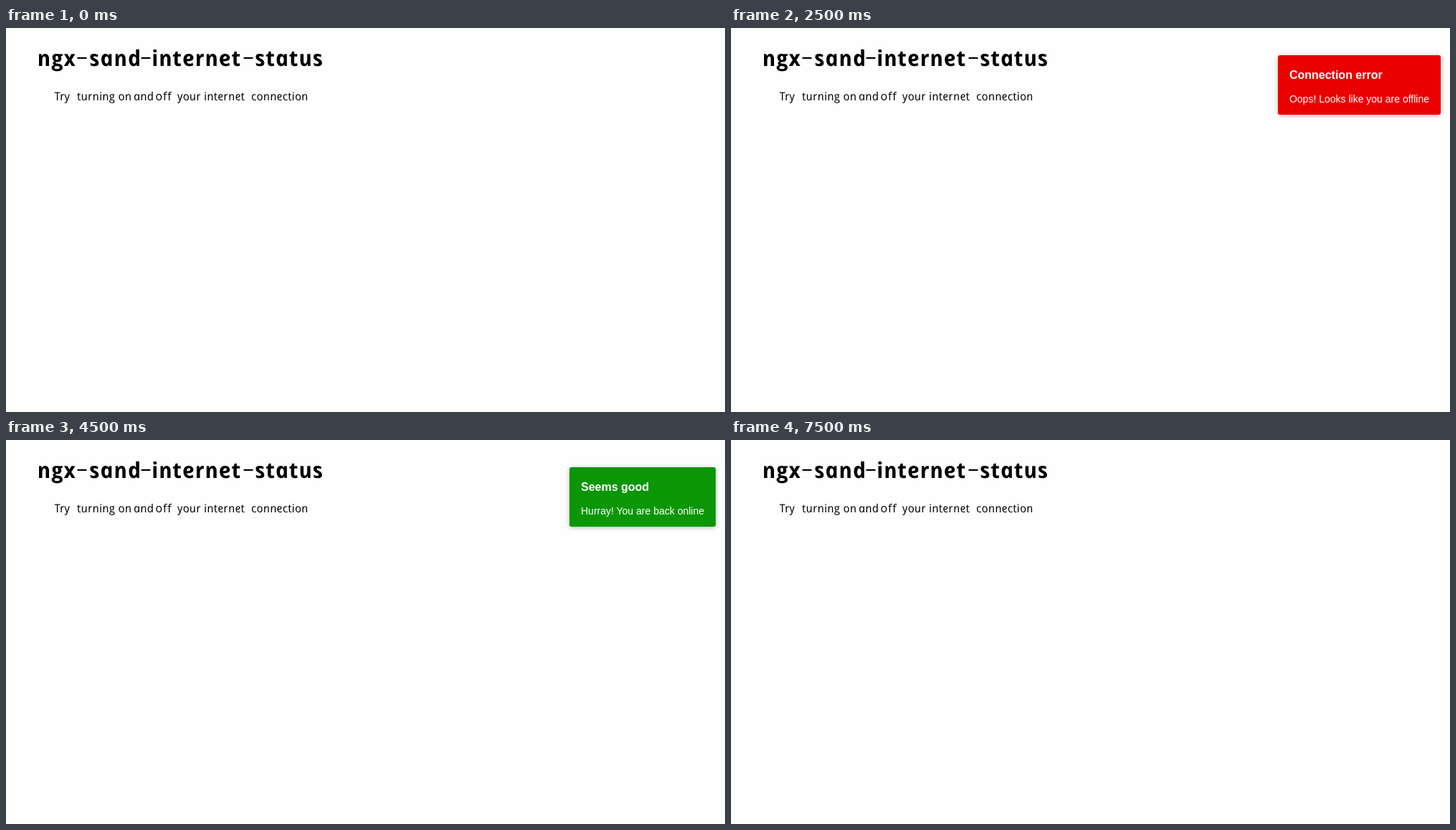
Write an HTML page that moves like this. It is 1003 px wide and 536 px high and loops after 8 s.

```html
<!DOCTYPE html>
<html lang="en">
<head>
<meta charset="utf-8">
<title>ngx-sand-internet-status</title>
<style>
  html, body { margin: 0; width: 100%; height: 100%; overflow: hidden; background: #fefefe; }
  svg { position: absolute; left: 0; top: 0; }
  /* Italic letterforms set upright give a casual, single-storey hand. */
  text { font: italic 16px "Open Sans", "Noto Sans", sans-serif; letter-spacing: .25px; }
  .head { font-size: 30.5px; font-weight: bold; letter-spacing: .9px; }
  .dash { font-size: 56px; font-weight: 300; font-style: normal; letter-spacing: 0; text-anchor: middle; }
  .plain { font-style: normal; letter-spacing: .8px; font-variant-ligatures: none; }
  #toast {
    position: absolute; right: 13px; top: 38px; height: 83px; padding: 0 16px;
    border-radius: 3px; box-shadow: 0 1px 6px rgba(0, 0, 0, .3);
    color: #fff; font: 14px/18px "Liberation Sans", Arial, sans-serif; white-space: nowrap;
  }
  #toast b { position: absolute; left: 16px; top: 19px; font-size: 16px; }
  #toast span { position: relative; top: 52px; display: block; }
</style>
</head>
<body>
<svg width="1003" height="536"></svg>
<div id="toast"><b></b><span></span></div>
<script>
  const svg = document.querySelector('svg');
  const toast = document.getElementById('toast');
  const [title, message] = toast.children;

  function addText(content, x, y, cls = '', skew = 12) {
    const el = document.createElementNS(svg.namespaceURI, 'text');
    el.textContent = content;
    el.setAttribute('class', cls);
    el.setAttribute('transform', `translate(${x} ${y}) skewX(${skew})`);
    svg.append(el);
  }

  function addWords(words, starts, y, cls) {
    words.split(' ').forEach((word, i) => {
      // The italic f has a tail, so words with an f use the roman shape.
      if (word.includes('f')) addText(word, starts[i], y, 'plain', 0);
      else addText(word, starts[i], y, cls);
    });
  }

  addWords('ngx sand internet status', [45.5, 118, 205, 349], 53, 'head');
  for (const x of [106, 195, 338]) addText('-', x, 57, 'dash', 0);
  addWords('Try turning on and off your internet connection',
    [68.5, 100, 157.5, 179, 208.5, 240, 277, 343], 101);

  const offline = ['Connection error', 'Oops! Looks like you are offline'];
  const online = ['Seems good', 'Hurray! You are back online'];

  // Start time, wording, background, opacity
  const steps = [
    [0, offline, '#0b9606', 0],
    [1000, offline, '#2c7a06', 1],
    [1250, offline, '#cd1201', 1],
    [1500, offline, '#eb0000', 1],
    [4000, online, '#c50000', 1],
    [4250, online, '#239000', 1],
    [4500, online, '#0b9606', 1],
    [6000, online, '#0b9606', .85],
    [6250, online, '#0b9606', .1],
    [6500, online, '#0b9606', 0]
  ];
  let shown;

  function draw(now) {
    const time = now % 8000;
    const step = steps.findLast(([start]) => start <= time) || steps[0];
    if (step !== shown) {
      const [, words, color, opacity] = shown = step;
      [title.textContent, message.textContent] = words;
      toast.style.background = color;
      toast.style.opacity = opacity;
    }
    requestAnimationFrame(draw);
  }
  draw(0);
</script>
</body>
</html>
```
